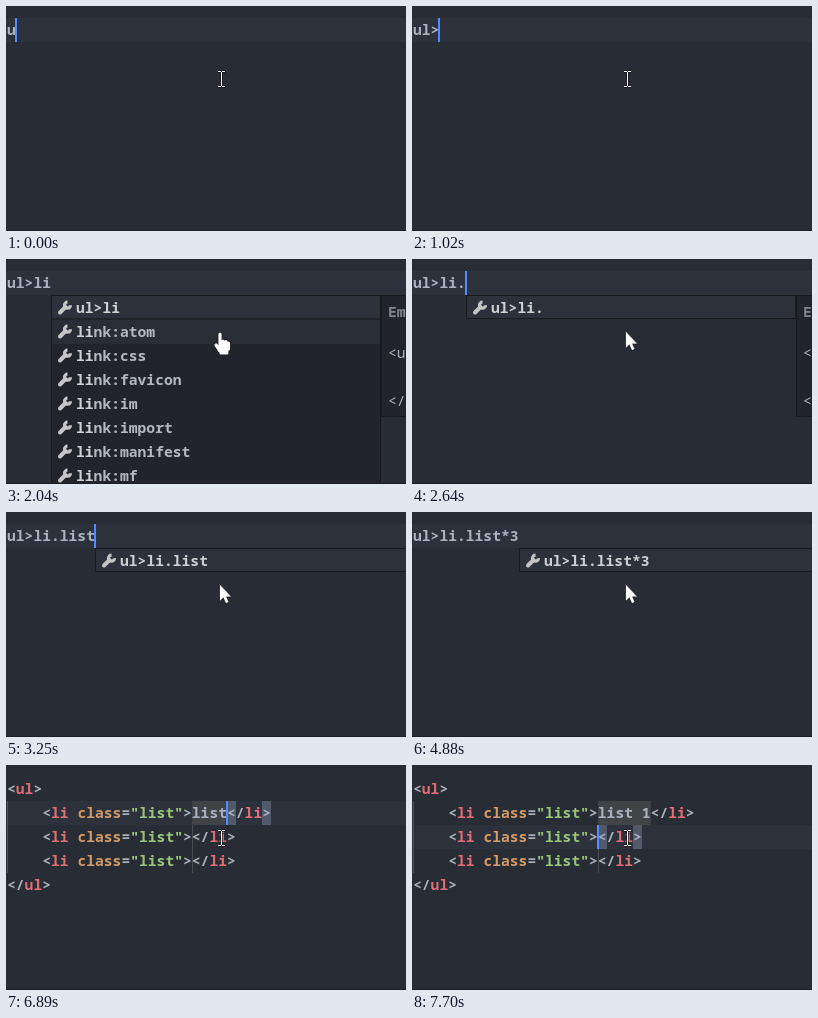
Write an HTML page with a canvas that moves like this. It is 400x225 px and loops after 8000 ms.

```html
<!DOCTYPE html>
<html>
<head>
<meta charset="utf-8">
<style>
html, body { margin: 0; width: 100%; height: 100%; overflow: hidden; background: #282c34; }
canvas { display: block; width: 400px; height: 225px; }
</style>
</head>
<body>
<canvas id="stage" width="400" height="225"></canvas>
<script>
const ctx = document.getElementById('stage').getContext('2d');
const LOOP = 8000, TICK = 202.7, LEAD = 8;
const CW = 8.8, ROW = 24, TOP = 12, LIST_W = 330;
const FG = '#abb2bf', BRIGHT = '#cdcfd3', EDGE = '#181a1f', PANEL = '#21252b', LINE = '#2c313c';
const TAG = '#e06c75', ATTR = '#d19a66', STR = '#98c379';

// One entry per tick: keys typed, empty = idle, _ = caret hidden
const abbrKeys = 'u,l,,_,_,>,,l,i,,_,_,_,.,l,i,st,,_,*,,3,,,_'.split(',');
const itemKeys = ',,,_,_,,,l,i,st, ,1,'.split(',');

const extras = {
  'ul': ['ul+'],
  'ul>l': ['label', 'legend', 'li', 'link', 'link:atom', 'link:css', 'link:favicon'],
  'ul>li': ['atom', 'css', 'favicon', 'im', 'import', 'manifest', 'mf'].map(s => 'link:' + s)
};

const pointers = {
  beam: new Path2D('M212 65.5h3m1 0h3M215.5 66v14M212 80.5h3m1 0h3'),
  arrow: new Path2D('M214 73v15.5l3.5-3.2 2.5 5.7 2.4-1-2.4-5.6h4.7z'),
  hand: new Path2D('M214 75v16m3-9v9m3-8.5v8.5m2.5-7v6M210 86l4 6h7m-6 2h6')
};

const typed = (keys, tick) => keys.slice(0, tick + 1).join('').replaceAll('_', '');
const col = n => 1 + n * CW;
const rowTop = r => TOP + r * ROW;

function rect(x, y, w, h, color) {
  ctx.fillStyle = color;
  ctx.fillRect(x, y, w, h);
}

function panel(x, y, w, h) {
  rect(x, y, w, h, EDGE);
  rect(x + 1, y + 1, w - 2, h - 2, PANEL);
}

function text(s, x, row, color = FG, weight = 700) {
  ctx.font = weight + ' 14.667px "Noto Sans Mono", monospace';
  ctx.fillStyle = color;
  ctx.fillText(s, x, rowTop(row) + 17);
  return x + s.length * CW;
}

function runs(parts, x, row) {
  for (const [s, color] of parts) x = text(s, x, row, color);
}

function caret(n, row) {
  rect(Math.floor(n * CW + .5), rowTop(row), 2, ROW, '#528bff');
}

function stroke(path, width, color) {
  ctx.lineWidth = width;
  ctx.strokeStyle = color;
  ctx.stroke(path);
}

function pointer(name) {
  const thick = name === 'hand' ? 3.2 : name === 'beam' ? 1 : .3;
  ctx.lineCap = name === 'beam' ? 'butt' : 'round';
  ctx.lineJoin = 'round';
  stroke(pointers[name], thick + 1.4, '#14161a');
  stroke(pointers[name], thick, '#fff');
  if (name === 'arrow') {
    ctx.fillStyle = '#fff';
    ctx.fill(pointers.arrow);
  }
}

function wrench(x, y) {
  ctx.lineCap = 'round';
  stroke(new Path2D(`M${x + 2} ${y + 11.5}l5.5-5.5`), 4, '#c5c5c5');
  const head = new Path2D();
  head.arc(x + 9.5, y + 4.2, 3, 0, -1.57);
  ctx.lineCap = 'butt';
  stroke(head, 3.2, '#c5c5c5');
}

function docs(x, word) {
  const body = word === 'ul' ? ['<ul>|</ul>'] : ['<ul>', '    <li>|</li>', '</ul>'];
  panel(x, 36, LIST_W, 26 + (body.length + 1) * ROW);
  text('Emmet Abbreviation', x + 7, 1.2, '#7f848e');
  body.forEach((s, i) => text(s, x + 7, 2.9 + i, FG, 500));
}

function popup(word) {
  const x = Math.round(col(word.length));
  const items = [word, ...(extras[word] || [])];
  const prefix = word.split('>').pop().length;
  panel(x, 36, LIST_W, items.length * ROW);
  rect(x + 1, 37, LIST_W - 2, ROW - 2, LINE);
  if (items.length > 1) rect(x + 1, 61, LIST_W - 2, ROW, '#292d35');
  items.forEach((s, i) => {
    const k = i ? prefix : s.length, row = i + 1 + 1 / ROW;
    wrench(x + 7, rowTop(row) + 5);
    const end = text(s.slice(0, k), x + 25, row, BRIGHT, 800);
    text(s.slice(k), end, row, '#b4b8c0', 650);
  });
  docs(x + LIST_W, word);
}

function typing(tick) {
  const word = typed(abbrKeys, tick), n = word.length;
  const open = n > 1 && !word.endsWith('>');
  rect(0, TOP, 400, ROW, LINE);
  text(word, 1, 0);
  if (abbrKeys[tick] !== '_') caret(n, 0);
  if (open) popup(word);
  pointer(!open ? 'beam' : extras[word] ? 'hand' : 'arrow');
}

function markup(tick) {
  const label = typed(itemKeys, tick);
  const active = tick < itemKeys.length ? 1 : 2;
  rect(0, rowTop(active), 400, ROW, LINE);
  rect(1, 36, 1, 3 * ROW, '#4b515d');
  runs([['<'], ['ul', TAG], ['>']], 1, 0);
  for (let r = 1; r <= 3; r++) {
    const s = r === 1 ? label : '', end = 21 + s.length;
    rect(Math.round(col(21)), rowTop(r), s.length * CW || 1, ROW, s ? '#414447' : '#484c4c');
    if (r === active)
      for (const n of [end, end + 4]) rect(Math.round(col(n)), rowTop(r), 9, ROW, '#515a6b');
    runs([['<'], ['li', TAG], [' class', ATTR], ['='], ['"list"', STR], ['>'],
      [s], ['</'], ['li', TAG], ['>']], col(4), r);
    if (r === active && itemKeys[tick] !== '_') caret(end, r);
  }
  runs([['</'], ['ul', TAG], ['>']], 1, 4);
  pointer('beam');
}

function draw(now) {
  const tick = Math.floor((now % LOOP + LEAD) / TICK);
  rect(0, 0, 400, 225, '#282c34');
  if (tick < abbrKeys.length) typing(tick);
  else markup(tick - abbrKeys.length);
  rect(0, 224, 400, 1, '#1d2026');
  requestAnimationFrame(draw);
}
draw(performance.now());
</script>
</body>
</html>
```
